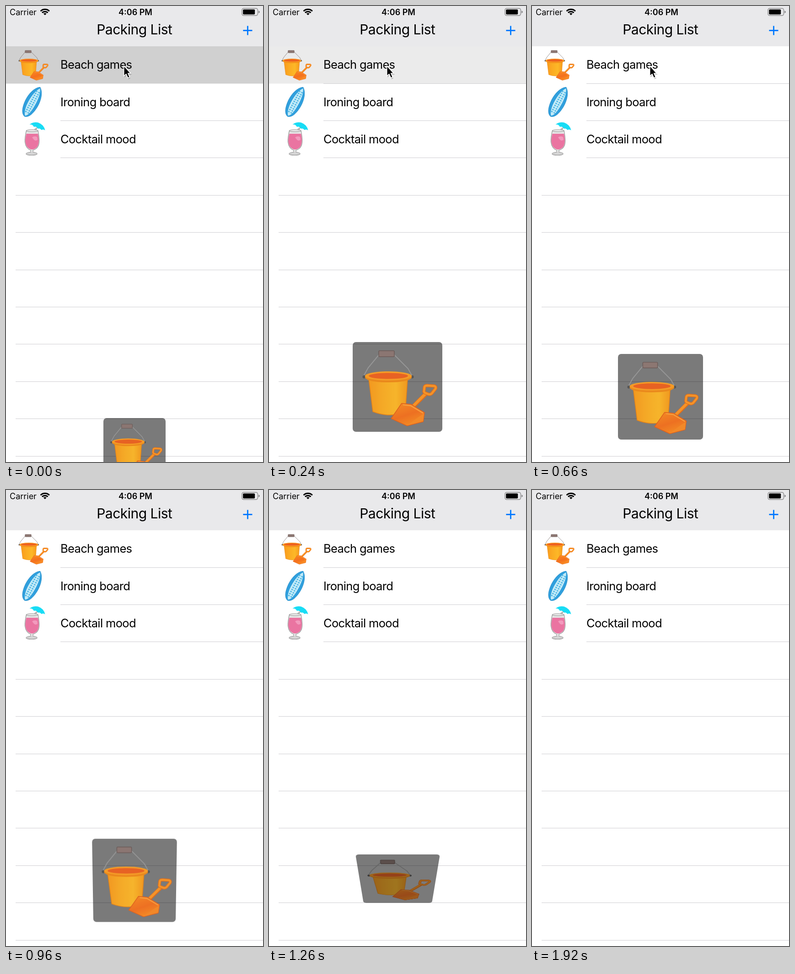
Write an HTML page that moves like this. It is 562 by 996 pixels and loops after 1.98 s.

```html
<!DOCTYPE html>
<html lang="en">
<head>
<meta charset="utf-8">
<title>Packing List</title>
<style>
  html, body { margin: 0; width: 100%; height: 100%; overflow: hidden; background: #fff; }
  #scene { position: absolute; left: 0; top: 0; width: 562px; height: 996px; color: #7d7371; }
  text { font-family: Inter, Roboto, "Liberation Sans", sans-serif; fill: #000; }
  #card { position: absolute; border-radius: 7px; background: rgba(0, 0, 0, .52); overflow: hidden; color: #999; }
  #card svg { display: block; width: 100%; height: 100%; opacity: .95; }
</style>
</head>
<body>
<svg id="scene" viewBox="0 0 562 996">
  <defs>
    <linearGradient id="pail">
      <stop offset="0" stop-color="#f99a1c"/><stop offset=".3" stop-color="#fbaa22"/>
      <stop offset=".7" stop-color="#fdb827"/><stop offset="1" stop-color="#f79a1b"/>
    </linearGradient>
    <linearGradient id="blade" x2=".5" y2="1">
      <stop offset="0" stop-color="#fb8d20"/><stop offset=".6" stop-color="#f4701e"/><stop offset="1" stop-color="#f98b20"/>
    </linearGradient>
    <path id="grip" d="M157 98Q158 95 163 95L178 96Q183 97 181 102L173 112Q170 115 166 114L158 111Q155 109 156 106Z"
          fill="none" stroke-linejoin="round"/>
    <symbol id="bucket" viewBox="0 0 196 196">
      <path d="M24 74L34 56L58 27M90 27L121 58L130 74" fill="none" stroke="currentColor" stroke-width="2"/>
      <rect x="57" y="19" width="34" height="13" rx="2" fill="#8d7772" stroke="#6b5a57" stroke-width="1.5"/>
      <circle cx="25" cy="76" r="3.500" fill="#555"/><circle cx="130" cy="76" r="3.500" fill="#555"/>
      <path d="M35 80L44 152Q80 166 115 153L120 80Z" fill="url(#pail)" stroke="#e88415" stroke-width="1.5"/>
      <path d="M27 74V78Q34 88 78 88Q122 88 129 78V74Z" fill="#f18a17"/>
      <ellipse cx="78" cy="74" rx="51" ry="10" fill="#fb9d22"/>
      <ellipse cx="78" cy="74" rx="43" ry="6.500" fill="#ee611f"/>
      <path d="M130 143L161 112" stroke="#e66d16" stroke-width="9"/>
      <path d="M130 142L160 112" stroke="#fb9524" stroke-width="6"/>
      <use href="#grip" stroke="#e66d16" stroke-width="7"/>
      <use href="#grip" stroke="#fb9524" stroke-width="4.5"/>
      <path d="M107 134L128 136L157 154L154 174L119 183L84 167Z" fill="url(#blade)"
            stroke="#e2601a" stroke-width="1.5" stroke-linejoin="round"/>
      <path d="M156 156Q139 166 120 182L154 173Z" fill="#f98a24"/>
      <path d="M110 137L127 139L154 155" fill="none" stroke="#fda03a" stroke-width="2.5"/>
    </symbol>
  </defs>
  <rect width="562" height="996" fill="#fff"/>
  <rect id="highlight" y="88" width="562" height="81.5" fill="#d0d0d0"/>
  <g id="rules" fill="#cfced2"></g>
  <rect width="562" height="88" fill="#e9e9eb"/>

  <text x="8" y="19.5" font-size="18">Carrier</text>
  <g fill="none" stroke="#000" stroke-width="3">
    <path d="M75.6 11.2A13.6 13.6 0 0 1 94.8 11.2M79 14.8A8.6 8.6 0 0 1 91.4 14.8"/>
    <path d="M85.2 20L81.8 16.8A4.8 4.8 0 0 1 88.6 16.8Z" fill="#000" stroke="none"/>
  </g>
  <text x="283" y="19.5" font-size="18" font-weight="600" text-anchor="middle">4:06 PM</text>
  <rect x="516" y="5.3" width="34.5" height="15.4" rx="3.6" fill="none" stroke="#8b8b8c" stroke-width="1.4"/>
  <rect x="518.2" y="7.5" width="26" height="11" rx="1.8"/>
  <path d="M552.2 10.2Q555 11 555 13T552.2 15.8Z" fill="#8b8b8c"/>
  <text x="280.8" y="61.5" font-size="30" letter-spacing="-.5" text-anchor="middle">Packing List</text>
  <path d="M518.5 53.5H538.5M528.5 43.5V63.5" stroke="#007aff" stroke-width="2.8"/>

  <use href="#bucket" x="19" y="89.5" width="78" height="78"/>
  <g transform="translate(57.5 209.5) rotate(28)">
    <path d="M0 -36.500C10 -30 15.500 -14 15 4C14 22 9 34 0 36C-9 34 -14 22 -15 4C-15.500 -14 -10 -30 0 -36.500Z"
          fill="#2f9fdd" stroke="#2b8fca" stroke-width=".8"/>
    <path d="M1 -34C7 -26 9 -12 8.500 4C8 20 6 30 0 34C-5 28 -8 18 -8 4C-8 -12 -5 -26 1 -34Z" fill="#c4ebf8"/>
    <path d="M-2.500 -26V29M3.500 -26V29" stroke="#4ab4e3" stroke-width="3.500" stroke-dasharray="2.500 2.500"/>
  </g>
  <g stroke-linejoin="round">
    <path d="M70 262L58 283" stroke="#777" stroke-width="1.4"/>
    <path d="M65 266L57 280" stroke="#999" stroke-width="1.2"/>
    <path d="M51.500 259Q59 252.500 70 254.500Q83 259 85.500 271.500Q81 268.500 78 271Q74 266 70 268Q66 262 61 264Q58 258 51.500 259Z" fill="#18dcf5"/>
    <path d="M44.500 272Q41 287 41.500 297Q43 311 54 315V319Q44 320 44 323Q45 326 56 326T68 323Q68 320 59 319V315Q72 311 72.500 297Q73 287 70 272Z"
          fill="#e6e6e6" stroke="#949494" stroke-width="1.2"/>
    <path d="M44.500 279Q41.500 291 42.500 298Q45 312 57 313.500Q70 312 71.500 298Q72.500 291 70 279Z" fill="#ea74a1"/>
    <path d="M57 287Q62 283 68 286L69 292Q65 296 61 292Z" fill="#f29abd"/>
    <ellipse cx="57" cy="272.500" rx="13" ry="2.200" fill="#f0f0f0" stroke="#888"/>
    <ellipse cx="56" cy="322.500" rx="10" ry="2" fill="#ddd" stroke="#aaa" stroke-width=".7"/>
  </g>
  <g font-size="25.5" letter-spacing="-.65">
    <text x="119" y="137.200">Beach games</text>
    <text x="119" y="218.600">Ironing board</text>
    <text x="119" y="300">Cocktail mood</text>
  </g>
  <g id="cursor" stroke-linejoin="round">
    <path d="M259 133V156L264 151.500L268 160L272 158L268 150H275Z" fill="#000" opacity=".2"/>
    <path d="M257.700 130.500V153L262.700 148.500L266.500 157L270.500 155.300L266.700 147H272.500Z" stroke="#fff" stroke-width="1.600"/>
  </g>
</svg>
<div id="card"><svg viewBox="0 0 196 196"><use href="#bucket" width="196" height="196"/></svg></div>

<script>
const LOOP = 1980, STEP = 60;
const REST = { size: 186.5, y: 854 };
const FLIP = { start: 813, duration: 1254, depth: 607 };
const byId = id => document.getElementById(id);
const card = byId('card'), highlight = byId('highlight'), cursor = byId('cursor');

for (let row = 0; row < 11; row++) {
  const x = row < 3 ? 119 : 21;
  byId('rules').insertAdjacentHTML('beforeend',
    `<rect x="${x}" y="${Math.floor(169.01 + row * 81.4)}" width="${562 - x}" height="1"/>`);
}
const firstRule = byId('rules').firstElementChild;

// Underdamped spring, 1 at launch and settling to 0; it is already moving at t = 0.
function spring(t) {
  const phase = 0.852 + 0.0118 * t, damping = 0.6;
  return Math.exp(-damping * phase) * (Math.cos(phase) + damping * Math.sin(phase));
}

function flipAngle(t) {
  const p = Math.min(1, Math.max(0, (t - FLIP.start) / FLIP.duration));
  return Math.PI * (1 - Math.cos(Math.PI * p)) / 2;
}

function render(t) {
  highlight.setAttribute('opacity', Math.max(0, 1 - t / 420));
  firstRule.setAttribute('opacity', t < STEP ? 0 : 1);
  cursor.setAttribute('visibility', t < 720 ? 'visible' : 'hidden');

  const offset = 75 * spring(t), size = REST.size - offset, angle = flipAngle(t);
  const recede = 1.1 * size / 2 * Math.sin(angle);
  const style = card.style;
  style.width = style.height = size + 'px';
  style.left = 281 - size / 2 + 'px';
  style.top = REST.y + 2.28 * offset - size / 2 + 'px';
  style.visibility = angle < Math.PI / 2 ? 'visible' : 'hidden';
  style.transform = angle ? `perspective(${FLIP.depth}px) translateZ(${-recede}px) rotateX(${-angle}rad)` : 'none';
  style.filter = angle ? `brightness(${Math.max(0, Math.cos(angle))})` : 'none';
}

const began = performance.now();
function tick() {
  const t = (performance.now() - began) % LOOP;
  render(Math.floor(t / STEP) * STEP);
  requestAnimationFrame(tick);
}
render(0);
requestAnimationFrame(tick);
</script>
</body>
</html>
```
